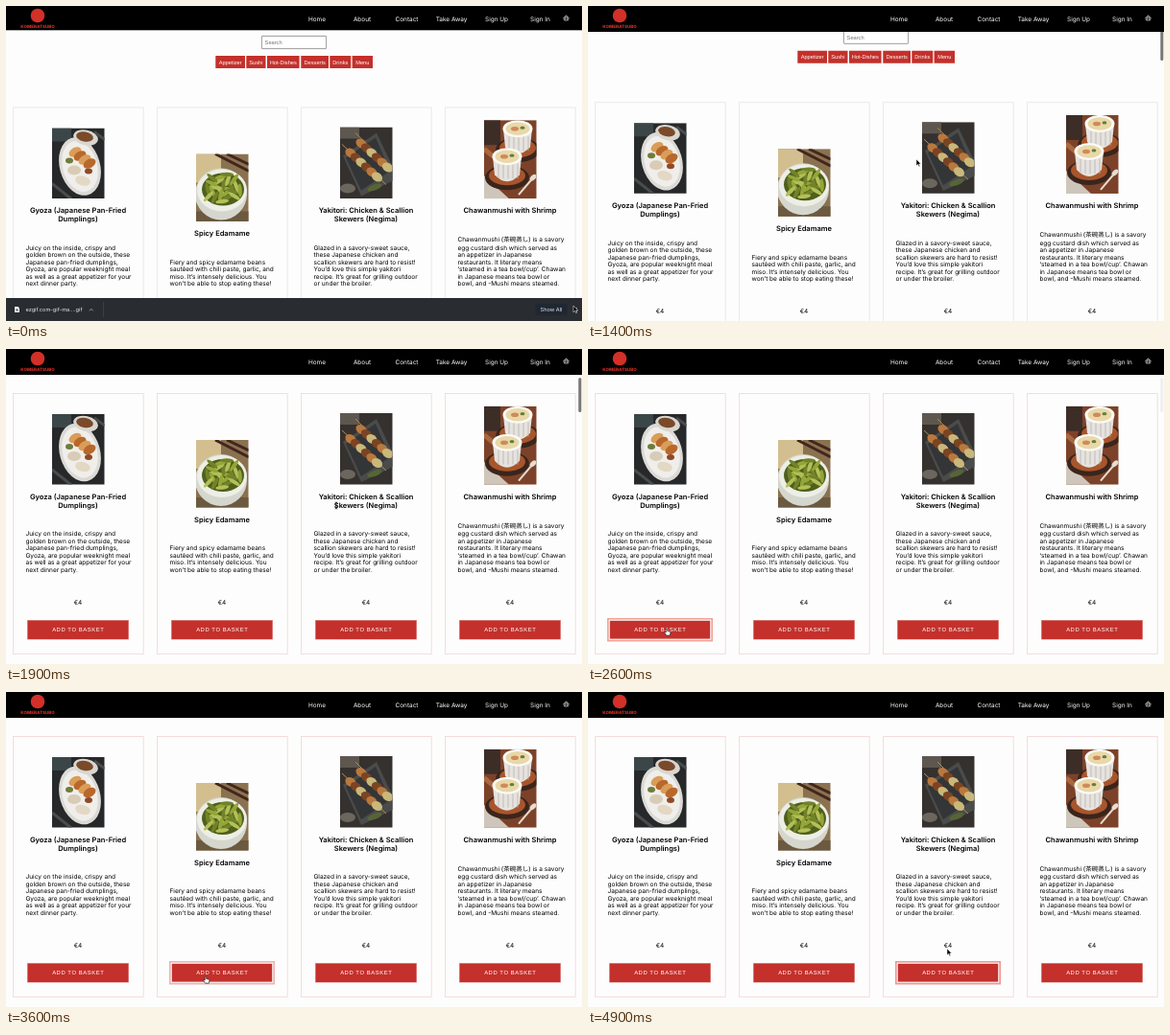
These frames come from a looping animation (600x329 px, 5000 ms). An HTML page:

```html
<!DOCTYPE html>
<html lang="en">
<head>
<meta charset="utf-8">
<title>Menu</title>
<style>
html, body { margin: 0; width: 100%; height: 100%; overflow: hidden; background: #fdfdfd; }
#stage { display: block; width: 100vw; height: 100vh; }
text { font: 6.53px Inter, "Noto Sans CJK JP", "Noto Sans CJK", sans-serif; text-rendering: geometricPrecision; fill: #000; }
.mid { text-anchor: middle; }
.title { font-size: 7.5px; font-weight: 600; }
.nav { font-size: 6.45px; fill: #fff; }
.ui { font: 5.7px "Liberation Sans", Arial, sans-serif; fill: #fff; }
.buy { font-size: 5.9px; letter-spacing: .57px; }
.brand { font-size: 4.5px; font-weight: 800; fill: #d23028; }
.file { font-size: 5.6px; fill: #e8eaed; }
</style>
</head>
<body>
<svg id="stage" viewBox="0 0 600 329" preserveAspectRatio="none"></svg>
<script>
const RED = '#c4302b';
const stage = document.getElementById('stage');

const rect = (x, y, w, h, fill, more = '') =>
  `<rect x="${x}" y="${y}" width="${w}" height="${h}" fill="${fill}" ${more}/>`;
const oval = (x, y, rx, ry, fill, turn = 0) =>
  `<ellipse cx="${x}" cy="${y}" rx="${rx}" ry="${ry}" fill="${fill}" transform="rotate(${turn} ${x} ${y})"/>`;
const line = (d, color, w) =>
  `<path d="${d}" fill="none" stroke="${color}" stroke-width="${w}"/>`;
const text = (x, y, s, cls = '') => `<text x="${x}" y="${y}" class="${cls}">${s}</text>`;

// Simplified dish photographs, each 54.5 wide
function gyoza() {
  let s = rect(0, 0, 55, 74, '#26282a') + rect(0, 0, 20, 14, '#3b4648') +
    line('M0 58L20 74M44 4L55 12', '#4a4c4c', 3) +
    oval(29, 40, 21, 31, '#dcdad6', -16) + oval(29, 40, 18, 27, '#f0eeea', -16) +
    oval(35, 10, 13, 8, '#d9d6d0', 12) + oval(34, 9, 9, 5, '#7a4a2a', 12);
  for (let i = 0; i < 4; i++)
    s += oval(24 + i * 5, 25 + i * 4, 7, 4.5, i % 2 ? '#b8682c' : '#d99d58', -30);
  return s + oval(23, 44, 7, 5, '#d9ccb6') + oval(32, 55, 8, 5, '#e3d8c4', 15) +
    oval(18, 34, 4, 3, '#6e7c3d') + oval(38, 45, 4, 3, '#8f4a26');
}

function edamame() {
  let s = rect(0, 0, 55, 71, '#8a7250') + rect(0, 0, 26, 30, '#d3be90') +
    line('M20 0L55 18M32 0L55 11', '#43261d', 3) + rect(0, 60, 55, 11, '#6b5940') +
    oval(26, 42, 27, 27, '#d5d7cf') + oval(27, 38, 26, 22, '#edeee6') + oval(28, 37, 22, 17, '#4f5f1c');
  for (let i = 0; i < 24; i++) {
    const a = i * 2.4, r = Math.sqrt(i) * 3.9;
    s += oval(28 + r * Math.cos(a), 36 + r * .8 * Math.sin(a), 7, 2.1,
      ['#94a637', '#b3bf58', '#71822a'][i % 3], i * 47);
  }
  return s;
}

function yakitori() {
  let s = rect(0, 0, 55, 75, '#35312e') + rect(0, 0, 20, 12, '#5d574f') +
    '<path d="M3 30L38 6 55 42V56L22 72Z" fill="#4a4b4b"/><path d="M6 32L37 11 52 46 22 66Z" fill="#333537"/>' +
    oval(8, 64, 8, 5, '#6b665e') + line('M2 18L48 60M16 6L54 44', '#b08d58', 1);
  for (let k = 0; k < 2; k++)
    for (let i = 0; i < 6; i++)
      s += oval(11 + k * 11 + i * 5.5, 27 - k * 10 + i * 5, 6, 4.5,
        i % 3 == 2 ? '#c9b87a' : i % 2 ? '#7b4422' : '#b8783e', 35);
  return s + oval(36, 63, 8, 3, '#566535', -20);
}

function chawanmushi() {
  const cup = (x, y) => oval(x, y + 22, 23, 13, '#3a251c') + oval(x, y + 20, 19, 10, '#a8552c') +
    `<path d="M${x - 15} ${y}L${x - 13} ${y + 19}Q${x} ${y + 33} ${x + 13} ${y + 19}L${x + 15} ${y}Z" fill="#e6e3df"/>` +
    [-9, -4, 1, 6, 11].map(d => line(`M${x + d} ${y + 8}v15`, '#b5b2ae', .8)).join('') +
    oval(x, y, 15.5, 9, '#fbfaf7') + oval(x, y, 12.5, 6.7, '#e9d8a8') +
    oval(x - 3, y, 4, 2.3, '#d08a5c') + oval(x + 5, y - 1, 2.4, 1.6, '#60803c');
  return rect(0, 0, 55, 82, '#7c4229') + rect(0, 0, 17, 26, '#3c2d27') +
    '<path d="M0 58L26 82H0Z" fill="#cfc6bb"/>' + line('M0 30L12 40', '#a9683f', 5) +
    cup(35, 9) + cup(24, 38) + line('M36 78L53 58', '#e6ddd0', 2) + oval(51, 60, 4, 2.5, '#e6ddd0', -45);
}

const dishes = [
  { art: gyoza, top: 127.5, h: 73.5, title: ['Gyoza (Japanese Pan-Fried', 'Dumplings)'], y: 216.2,
    about: ['Juicy on the inside, crispy and', 'golden brown on the outside, these', 'Japanese pan-fried dumplings,',
      'Gyoza, are popular weeknight meal', 'as well as a great appetizer for your', 'next dinner party.'] },
  { art: edamame, top: 154.5, h: 70.5, title: ['Spicy Edamame'], y: 240.2,
    about: ['Fiery and spicy edamame beans', 'sautéed with chili paste, garlic, and',
      'miso. It’s intensely delicious. You', 'won’t be able to stop eating these!'] },
  { art: yakitori, top: 126.5, h: 74.5, title: ['Yakitori: Chicken &amp; Scallion', 'Skewers (Negima)'], y: 216.2,
    about: ['Glazed in a savory-sweet sauce,', 'these Japanese chicken and', 'scallion skewers are hard to resist!',
      'You’d love this simple yakitori', 'recipe. It’s great for grilling outdoor', 'or under the broiler.'] },
  { art: chawanmushi, top: 119.2, h: 82, title: ['Chawanmushi with Shrimp'], y: 216.2,
    about: ['Chawanmushi (茶碗蒸し) is a savory', 'egg custard dish which served as', 'an appetizer in Japanese',
      'restaurants. It literary means', '‘steamed in a tea bowl/cup’. Chawan', 'in Japanese means tea bowl or',
      'bowl, and -Mushi means steamed.'] }
];
const ringColors = ['#eda598', '#ecb4b0', '#ee9794'];

function card(d, i) {
  const last = d.about.length - 1;
  return `<g transform="translate(${i * 150} 0)">` +
    rect(7.5, 106, 135.7, 272, '#fdfdfd', 'class="frame"') +
    `<svg x="48" y="${d.top}" width="54.5" height="${d.h}">${d.art()}</svg>` +
    d.title.map((s, k) => text(75, d.y + k * 9.2, s, 'title mid')).join('') +
    d.about.map((s, k) => text(20.5, 292.4 - (last - k) * 7.5 - (last == 6 && !k ? 1.3 : 0), s)).join('') +
    text(75, 326.5, '€4', 'mid') +
    rect(20, 340.5, 110, 24.5, ringColors[i] || 'none', 'class="ring"') +
    rect(22.2, 342.7, 105.6, 20, RED, 'class="btn"') +
    text(75.3, 354.9, 'ADD TO BASKET', 'ui buy mid') + '</g>';
}

const tabs = [['Appetizer', 218.3, 30.7], ['Sushi', 250.3, 20.2], ['Hot-Dishes', 272, 33.6],
  ['Desserts', 307.3, 28.7], ['Drinks', 337.3, 22], ['Menu', 360.6, 21.4]];
const links = [['Home', 324], ['About', 371], ['Contact', 417.5], ['Take Away', 464], ['Sign Up', 511], ['Sign In', 556.5]];

stage.innerHTML = rect(0, 0, 600, 329, '#fdfdfd') +
  '<g id="page">' +
  rect(266.4, 31.4, 67.2, 13.2, '#fff', 'stroke="#858585" stroke-width=".8" rx=".6"') +
  `<text x="269.6" y="40" class="ui" style="fill:#757575">Search</text>` +
  tabs.map(([s, x, w]) => rect(x, 52, w, 13, RED) + text(x + w / 2, 60.5, s, 'ui mid')).join('') +
  dishes.map(card).join('') + '</g>' +
  rect(596.3, 20, 3, 36, '#777', 'id="thumb" rx="1.5"') +
  rect(0, 0, 600, 27, '#000', 'id="nav"') +
  oval(33, 10, 7.3, 7.3, '#d23028') + text(33, 22.6, 'KOMERATSUBO', 'brand mid') +
  links.map(([s, x]) => text(x, 15.6, s, 'nav mid')).join('') +
  line('M580.8 12h5.4l-.7 3h-4zM582 12l1-2h1l1 2M582.6 12.5v2M584.4 12.5v2', '#fff', .6) +
  '<g id="bar">' + rect(0, 305, 600, 24, '#292c31') +
  '<path d="M9 314h3.5l1.5 1.5v4.5h-5z" fill="#f1f3f4"/>' + rect(10.3, 316.5, 2.4, 2, '#5f6368') +
  text(20.5, 319.2, 'ezgif.com-gif-ma....gif', 'file') +
  line('M87 318.3l1.8-1.9 1.8 1.9', '#c4c7cc', .7) + rect(101, 309, .6, 16, '#4a4d52') +
  rect(551.5, 311, 33, 12, '#1f2732', 'rx="1.5"') + text(568, 319, 'Show All', 'file mid') +
  line('M591 315l4 4m0-4l-4 4', '#d0d3d8', .7) + '</g>' +
  '<g id="cursor"><path id="arrow" d="M0 0V6.8L1.6 5.4 2.7 7.8 3.8 7.3 2.7 5H4.8Z" fill="#000" stroke="#fff" stroke-width=".5"/>' +
  '<path id="hand" d="M-.8-2.5q.8-.9 1.5 0v2l2.5.6q1 .3.7 1.6l-.7 2.5h-3.5l-2.2-3q.1-1 1.7-.2z" fill="#fff" stroke="#000" stroke-width=".6"/>' +
  '<path id="beam" d="M.8 0q1.2 0 1.2 1V6q0 1-1.2 1M3.2 0Q2 0 2 1M2 6q0 1 1.2 1M1.2 3.7h1.6" fill="none" stroke="#000" stroke-width=".7"/></g>';

const $ = id => document.getElementById(id);
const [page, thumb, nav, bar, cursor, arrow, hand, beam] =
  ['page', 'thumb', 'nav', 'bar', 'cursor', 'arrow', 'hand', 'beam'].map($);
const frames = [...document.querySelectorAll('.frame')];
const rings = [...document.querySelectorAll('.ring')];
const buttons = [...document.querySelectorAll('.btn')];
const set = (el, name, value) => el.setAttribute(name, value);
const show = (el, on) => set(el, 'visibility', on ? 'visible' : 'hidden');
const ramp = (t, a, b) => Math.min(1, Math.max(0, (t - a) / (b - a)));
const ease = (t, a, b) => { const p = ramp(t, a, b); return p * p * (3 - 2 * p); };

// Pointer stops: time, x, y
const stops = [[1100, 342, 160], [2000, 342, 160], [2400, 82, 295], [2900, 82, 295], [3400, 208, 300],
  [4000, 208, 300], [4400, 370, 296], [4600, 370, 296], [4850, 374, 268]];

function pointer(t) {
  if (t < 1100) return [591, 313];
  const i = stops.findIndex(s => s[0] > t);
  if (i < 0) return stops[stops.length - 1].slice(1);
  const [a, x, y] = stops[i - 1], [b, u, v] = stops[i], p = ease(t, a, b);
  return [x + (u - x) * p, y + (v - y) * p];
}

function draw(t) {
  const scroll = 59.5 * ease(t, 1290, 1890);
  set(page, 'transform', `translate(0 ${-scroll})`);
  set(thumb, 'y', 20 + scroll / 6);
  set(thumb, 'opacity', t < 1400 ? 0 : 1 - .9 * ramp(t, 2200, 2600) - .1 * ramp(t, 2600, 2800));
  set(nav, 'height', t < 1100 ? 25.3 : 27);
  show(bar, t < 1100);
  frames.forEach(f => set(f, 'stroke', t < 1700 ? '#e9e9e9' : '#f6dcdc'));

  const focus = t < 2500 ? -1 : t < 3500 ? 0 : t < 4400 ? 1 : 2;
  rings.forEach((r, i) => show(r, i == focus));
  buttons.forEach((b, i) => {
    set(b, 'stroke', i == focus ? '#fff' : '#e3a09d');
    set(b, 'stroke-width', i == focus ? 1.1 : .4);
  });

  const [x, y] = pointer(t);
  const over = y > 283 && y < 303 && x % 150 > 22 && x % 150 < 128;
  const typing = t >= 1800 && t <= 2000;
  set(cursor, 'transform', `translate(${x} ${y})`);
  show(hand, over);
  show(beam, typing);
  show(arrow, !over && !typing);
}

function tick() {
  draw(Math.floor(performance.now() % 5000 / 100) * 100);
  requestAnimationFrame(tick);
}
tick();
</script>
</body>
</html>
```
